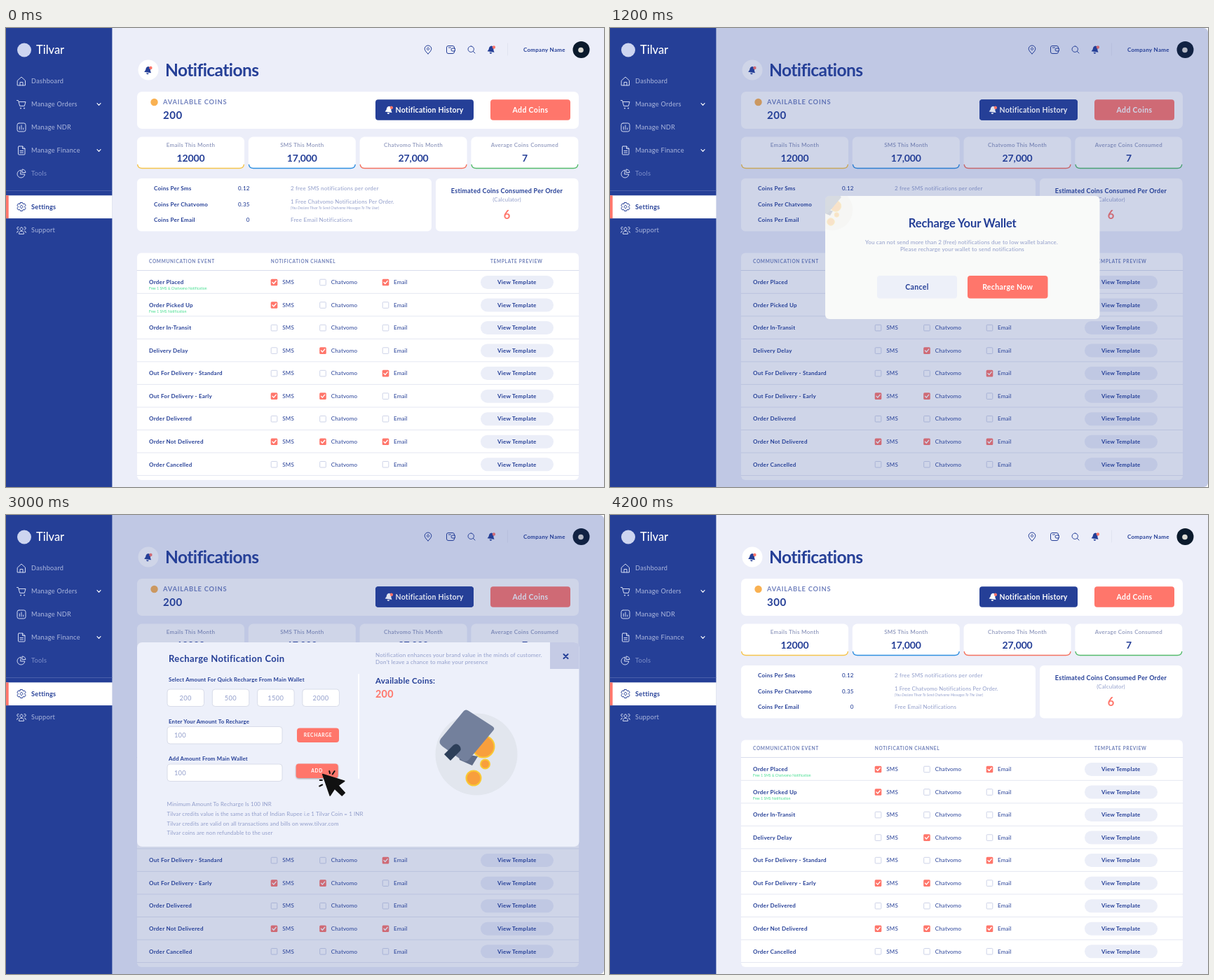
Recreate the animation shown at these times as an HTML page. Size 853 by 656 pixels, loop 5200 ms.

```html
<!DOCTYPE html>
<html lang="en">
<head>
<meta charset="utf-8">
<title>Notifications</title>
<style>
html, body { margin: 0; width: 100%; height: 100%; overflow: hidden; background: #eceef9; }
svg { display: block; width: 100%; height: 100%; }
text { font-family: Lato, "Open Sans", sans-serif; white-space: pre; }
.line { fill: none; stroke-linecap: round; stroke-linejoin: round; }
.lift { filter: drop-shadow(0 1.5px 1.2px #0005); }
</style>
</head>
<body>
<svg id="stage" viewBox="0 0 853 656"></svg>
<script>
const BLUE = '#253f97', CORAL = '#ff766b', SOFT = '#929ecb', WHITE = '#fff';
const BRAND = 'Tilvar', CHAT = 'Chatvomo';
const STEP = 600, LOOP = 5200;

const rect = (x, y, w, h, fill, r = 0, more = '') =>
  `<rect x="${x}" y="${y}" width="${w}" height="${h}" rx="${r}" fill="${fill}" ${more}/>`;
const disc = (x, y, r, fill, more = '') =>
  `<circle cx="${x}" cy="${y}" r="${r}" fill="${fill}" ${more}/>`;
const shape = (d, fill) => `<path d="${d}" fill="${fill}"/>`;
const line = (d, color, width = 1) =>
  `<path class="line" d="${d}" stroke="${color}" stroke-width="${width}"/>`;
const at = (x, y, body, more = '') => `<g transform="translate(${x} ${y}) ${more}">${body}</g>`;

const text = (s, x, y, size, fill = BLUE, weight = 400, anchor = 'start', gap = .02) =>
  `<text x="${x}" y="${y}" font-size="${size}" fill="${fill}" font-weight="${weight}" ` +
  `text-anchor="${anchor}" letter-spacing="${gap}em">${s.replace(/&/g, '&amp;')}</text>`;
const bold = (s, x, y, size = 8, fill = BLUE, gap = .033) => text(s, x, y, size, fill, 700, 'start', gap);
const mid = (s, x, y, size, fill = BLUE, gap = .033, weight = 700) =>
  text(s, x, y, size, fill, weight, 'middle', gap);

const button = (s, x, y, w, h, fill, color, size, lifted, gap) =>
  `<g ${lifted ? 'class="lift"' : ''}>${rect(x, y, w, h, fill, 4)}</g>` +
  mid(s, x + w / 2, y + h / 2 + size * .36, size, color, gap);

const ICONS = {
  home: 'M-5.5-1L0-6L5.5-1V6H-5.5ZM-2 6V1.5H2V6',
  cart: 'M-6.5-5.5h2l2.2 8h6.6l1.7-6h-9.5M-1 5.2a.6.6 0 1 0 .1 0M4 5.2a.6.6 0 1 0 .1 0',
  chart: 'M-3.5-6h7q2.5 0 2.5 2.5v7q0 2.5-2.5 2.5h-7q-2.5 0-2.5-2.5v-7q0-2.5 2.5-2.5M-2.7 3V-1M0 3V-3M2.7 3V1',
  doc: 'M-3.5-6H1.5L5-2.5V5q0 1-1 1h-7.5q-1 0-1-1V-5q0-1 1-1M1.5-6v3.5H5M-2 .5H2.5M-2 3H2.5',
  pie: 'M-1-4.8A5.4 5.4 0 1 0 4.8 1H-1ZM1.5-6A5 5 0 0 1 6-1.5H1.5Z',
  gear: 'M-1.5-6h3l.8 2 2.2-.5 1.5 2.6-1.5 1.9 1.5 1.9-1.5 2.6-2.2-.5-.8 2h-3l-.8-2-2.2.5-1.5-2.6 1.5-1.9-1.5-1.9 1.5-2.6 2.2.5ZM0-2a2 2 0 1 0 .1 0',
  people: 'M0-4a2.2 2.2 0 1 0 .1 0M-3.5 5q0-3.7 3.5-3.7T3.5 5ZM-4-4.5a1.7 1.7 0 1 0-.5 3.3M4-4.5a1.7 1.7 0 1 1 .5 3.3M-6.3 3.5q0-2.7 2-2.7M6.3 3.5q0-2.7-2-2.7',
  pin: 'M0 6Q-4.8 1.5-4.8-1.2a4.8 4.8 0 0 1 9.6 0Q4.8 1.5 0 6M0-2.8a1.6 1.6 0 1 0 .1 0',
  wallet: 'M5.5-2V-3q0-2.5-2.5-2.5H-3q-2.5 0-2.5 2.5v6q0 2.5 2.5 2.5h6q2.5 0 2.5-2.5V2M6-2H3a2 2 0 0 0 0 4h3ZM-2.5-3h3',
  search: 'M-.8-5a4.2 4.2 0 1 0 .1 0M2.4 2.4L5 5',
  down: 'M-2.5-1.3L0 1.3L2.5-1.3',
  cross: 'M-3-3L3 3M3-3L-3 3'
};
const icon = (name, x, y, color = BLUE, width = 1) => at(x, y, line(ICONS[name], color, width));

const bell = (x, y, color) => at(x, y,
  shape('M0-5.5C-2.8-5-3.4-3-3.4 0L-5 3H5L3.4 0C3.4-3 2.8-5 0-5.5ZM-1.8 4h3.6q-.4 1.8-1.8 1.8t-1.8-1.8', color) +
  disc(3.4, -4, 2.2, CORAL), 'rotate(8)');

const ARROW = 'M1 1L32 10.8L23 17L32.5 27.5L28.5 31.5L18 21.5L11.5 31.5Z';
const CURSOR = shape(ARROW, '#111') + line(ARROW, '#111', 1.6) +
  line('M10.5-3.5l.8 3.2M18-3.5l-3 4.5M-3 9.5l3.2 0M-3.5 18l4-2', '#111', 2);

function sidebar() {
  const items = [['Dashboard', 'home', 76], ['Manage Orders', 'cart', 109], ['Manage NDR', 'chart', 142],
    ['Manage Finance', 'doc', 175], ['Tools', 'pie', 208], ['Settings', 'gear', 255.5], ['Support', 'people', 289]];
  return rect(0, 0, 151.4, 656, BLUE) + disc(26, 31.5, 10, '#cdd5f0') +
    text(BRAND, 43, 37, 16.4, WHITE, 500, 'start', 0) +
    line('M0 232.5H151', '#5368b0', .8) + rect(0, 239.3, 151.7, 32.8, WHITE) + rect(0, 239.3, 3.7, 32.8, CORAL) +
    items.map(([name, pic, y]) => {
      const on = name === 'Settings';
      return icon(pic, 22, y, on ? BLUE : '#d5dcf2') +
        text(name, 36, y + 3.2, 9.2, on ? BLUE : name === 'Tools' ? '#7f90cb' : '#adb8de', on ? 700 : 400, 'start', .03) +
        (/Orders|Finance/.test(name) ? icon('down', 132.5, y, WHITE, 1.2) : '');
    }).join('');
}

function header() {
  return icon('pin', 602, 31) + icon('wallet', 634, 31) + icon('search', 664, 31) + bell(692, 31, BLUE) +
    line('M715.5 22V39', '#dde1ef', .8) + bold('Company Name', 738, 34, 8) +
    disc(820.5, 31, 12, '#0b1a2c') + disc(820, 31.5, 3.8, '#dcdad2') +
    disc(203, 60, 14.5, WHITE) + bell(202.5, 60.5, BLUE) +
    bold('Notifications', 227, 69.3, 24.5, BLUE, -.023);
}

const historyButton = color => button('', 527, 102.3, 140, 29.5, BLUE, WHITE, 10) + bell(546, 117.3, color) +
  bold('Notification History', 555.5, 121, 10.5, color, .02);

function cards(coins, pressed) {
  const stats = [['Emails This Month', '12000', '#f5c44c'], ['SMS This Month', '17,000', '#2f8fe0'],
    [CHAT + ' This Month', '27,000', '#f4725f'], ['Average Coins Consumed', '7', '#55bb6c']];
  const rates = [['Sms', '0.12'], [CHAT, '0.35'], ['Email', '0']];
  return rect(187, 91, 630, 53, WHITE, 7) + disc(211.5, 106, 5.2, '#f9b152') +
    bold('AVAILABLE COINS', 224, 109.3, 9.3, '#7080bd', .085) + bold(coins, 224, 129.8, 15) +
    historyButton(WHITE) +
    button('Add Coins', 691, 102.3, 114, 29.5, CORAL, WHITE, 10.5, pressed) +
    stats.map(([name, n, color], i) => {
      const x = 187 + i * 158.8;
      return rect(x, 155.5, 153, 45.5, WHITE, 7) +
        line(`M${x + .7} 195.5Q${x + 1.5} 200.5 ${x + 7} 200.5h139q5.5 0 6.3-5`, color, 1.5) +
        mid(name, x + 76.5, 169.6, 8, '#8f98bd', .035, 600) + mid(n, x + 76.5, 191, 14, BLUE, -.01);
    }).join('') +
    rect(187, 215, 420, 75.5, WHITE, 6) + rect(613, 215, 203.5, 75.5, WHITE, 6) +
    rates.map(([name, n], i) => {
      const y = 232.3 + i * 22.5;
      return bold('Coins Per ' + name, 211, y) + text(n, 347.5, y, 8, BLUE, 500, 'end');
    }).join('') +
    text('2 free SMS notifications per order', 406, 232.3, 8, SOFT, 400, 'start', .025) +
    text(`1 Free ${CHAT} Notifications Per Order.`, 406, 251.2, 7.8, SOFT) +
    `<g font-style="italic">${text(`(You Declare ${BRAND} To Send ${CHAT} Messages To The User)`, 406, 258.8, 4.8, SOFT)}</g>` +
    text('Free Email Notifications', 406, 277.3, 8, SOFT, 400, 'start', .025) +
    mid('Estimated Coins Consumed Per Order', 714.5, 235.6, 9, BLUE, .028) +
    mid('(Calculator)', 714.5, 247.5, 7.8, SOFT, .02, 400) + mid('6', 714.5, 273, 16.5, CORAL, 0);
}

function table(hints) {
  const rows = [['Order Placed', '101'], ['Order Picked Up', '100'], ['Order In-Transit', '000'],
    ['Delivery Delay', '010'], ['Out For Delivery - Standard', '001'], ['Out For Delivery - Early', '110'],
    ['Order Delivered', '000'], ['Order Not Delivered', '111'], ['Order Cancelled', '000']];
  const channels = [['SMS', 382.5, 394.3], [CHAT, 452, 463.7], ['Email', 541.5, 553]];
  const head = (s, x) => bold(s, x, 336.3, 6.5, '#7080b9', .108);
  const check = (x, y, on) => on
    ? rect(x - 4.8, y - 4.8, 9.6, 9.6, CORAL, 1.5) + at(x, y, line('M-2.5 0L-.7 2L2.7-2', WHITE, 1.4))
    : rect(x - 4.3, y - 4.3, 8.6, 8.6, 'none', 1, 'stroke="#cdd3e8"');
  return rect(187, 321.5, 630, 324.5, WHITE, 6) + line('M187 346.5H817', '#d8ddec') +
    head('COMMUNICATION EVENT', 204) + head('NOTIFICATION CHANNEL', 377.7) + head('TEMPLATE PREVIEW', 691) +
    rows.map(([name, on], i) => {
      const y = 363.5 + i * 32.53;
      return bold(name, 204, y + 2.8) + line(`M187 ${y + 15.8}H817`, '#e1e5f1', .9) +
        channels.map(([label, x, tx], k) => check(x, y, on[k] === '1') + text(label, tx, y + 2.8, 8)).join('') +
        rect(677, y - 9.5, 104, 19, '#ebeef8', 9.5) + mid('View Template', 728.8, y + 2.8, 8);
    }).join('') +
    (hints ? text(`Free 1 SMS & ${CHAT} Notification`, 204, 374.3, 4.9, '#3fdc8c') +
      text('Free 1 SMS Notification', 204, 406.8, 4.9, '#3fdc8c') : '');
}

function wallet(back) {
  const coin = (x, y, r) => disc(x, y, r, '#f89f3c', 'stroke="#f9c935" stroke-width="2"');
  return disc(671, 342, 58.5, back) + coin(681, 331, 15.5) + coin(683.5, 356, 6.5) + coin(667, 376, 10.5) +
    shape('M645 340L673 345L665 358L647 350Z', '#5f6c88') +
    shape('M653 280Q656 277 660 280L694 302Q698 305 695 308L660 350Q656 354 651 351L623 331Q616 326 620 320Z', '#73809c') +
    shape('M625 342L638 329Q643 325 647 330T646 339L634 351Z', '#2d3f59');
}

function rechargePrompt(pressed) {
  return rect(307, 240, 391.5, 176, '#f9faf9', 6) +
    `<clipPath id="box">${rect(307, 240, 391.5, 176, WHITE, 6)}</clipPath>` +
    `<g clip-path="url(#box)" opacity=".25">${at(-18.5, 89, wallet('#eeece8'), 'scale(.5)')}</g>` +
    mid('Recharge Your Wallet', 502.7, 285.2, 16.5, BLUE, -.008) +
    mid('You can not send more than 2 (free) notifications due to low wallet balance.', 501.5, 309.2, 8, SOFT, .02, 400) +
    mid('Please recharge your wallet to send notifications', 502.5, 319.2, 8, SOFT, .02, 400) +
    button('Cancel', 381, 354, 114, 32.5, '#edf0f9', BLUE, 10.5) +
    button('Recharge Now', 510, 354, 114.5, 32.5, CORAL, WHITE, 10.5, pressed);
}

function rechargeForm(pressed) {
  const field = (x, y, w) => rect(x, y, w, 24.5, WHITE, 4, 'stroke="#d8dce9"');
  const notes = ['Minimum Amount To Recharge Is 100 INR',
    `${BRAND} credits value is the same as that of Indian Rupee i.e 1 ${BRAND} Coin = 1 INR`,
    `${BRAND} credits are valid on all transactions and bills on www.${BRAND.toLowerCase()}.com`,
    `${BRAND} coins are non refundable to the user`];
  return rect(187, 182, 630.5, 292, '#edf0fa', 7) +
    shape('M776 182H810.5Q817.5 182 817.5 189V220H776Z', '#c5cbe5') + icon('cross', 798.5, 202, BLUE, 2) +
    bold('Recharge Notification Coin', 232, 209.6, 13, BLUE, .03) +
    text('Notification enhances your brand value in the minds of customer.', 527, 202.6, 8, SOFT) +
    text('Don’t leave a chance to make your presence', 527, 213, 8, SOFT) +
    line('M503 228V376', WHITE, 2) +
    bold('Select Amount For Quick Recharge From Main Wallet', 232, 238.3, 7.8, BLUE, .025) +
    [200, 500, 1500, 2000].map((n, i) =>
      field(230 + i * 64.3, 249, 52.5) + mid('' + n, 256.2 + i * 64.3, 264.8, 9.3, SOFT, .04, 400)).join('') +
    bold('Enter Your Amount To Recharge', 232, 297.6, 7.8, BLUE, .025) + field(230, 302.5, 164) +
    text('100', 240, 318.2, 9.3, SOFT) +
    bold('Add Amount From Main Wallet', 232, 350.8, 7.8, BLUE, .025) + field(230, 356, 164) +
    text('100', 240, 371.7, 9.3, SOFT) +
    button('RECHARGE', 415, 304.5, 60, 20.5, CORAL, WHITE, 6.7, false, .1) +
    button('ADD', 413.7, 355.5, 60, 20.5, CORAL, WHITE, 6.7, pressed, .1) +
    notes.map((s, i) => text(s, 229.5, 416.3 + i * 13.6, 7.9, SOFT, 400, 'start', .015)).join('') +
    bold('Available Coins:', 527, 240.8, 11.5, BLUE, .025) + bold('200', 527, 261, 14.3, CORAL, .02) +
    wallet('#e2e6ee');
}

function success() {
  const person =
    line('M474 263L482 265L479 283M473 264L473 281', '#2e2b50', 6) +
    line('M471 244L464 257L450 262', '#f0647c', 4) + line('M482 241L492 234', '#f0647c', 4) +
    shape('M469 243Q476 238 484 242L486 263H466Z', '#f2708a') +
    disc(476.5, 234, 5.5, '#f3a894') +
    shape('M469 239Q466 229 473 227Q481 225 482 232Q487 238 483 247Q480 243 480 237Q476 236 474 232Q472 239 469 239', '#2e2b50');
  return rect(187, 182, 630.5, 292, WHITE, 7) + icon('cross', 798.5, 202, BLUE, 2) +
    shape('M442 206Q456 198 474 202T510 210T563 206V245Q553 256 563 268V293Q548 301 530 297T490 297T442 297V268Q446 256 442 244Z', '#e1f4f0') +
    line('M443 319H562', '#e1f4f0', 1.5) +
    disc(502, 246, 29, '#4fb04f') + rect(483, 222, 42, 88, '#10b49b', 5, 'stroke="#292b58" stroke-width="3"') +
    rect(494, 222, 20, 5, '#292b58', 2.5) + rect(500, 224, 8, 1, WHITE, .5) +
    disc(504, 266.5, 11, '#38c46b') + line('M499 267L502.5 270.5L509 263.5', WHITE, 2.2) + person +
    shape('M530 230Q527 219 541 218Q540 228 530 230M522 215Q526 213 529 218Q523 220 522 215', '#22a997') +
    line('M454 308L458 312L463 307M454 315L458 312L463 315', '#55a996', 2) +
    shape('M542 320Q545 315 547 319Q549 313 551 319Q554 315 555 320Z', '#18a98c') +
    mid('Transaction Successfull', 502.5, 344.2, 18.5, BLUE, 0) +
    mid('Your transaction for buying 100 coins was successfull', 502.5, 361.8, 8, SOFT, .015, 400) +
    rect(458.5, 389.5, 88, 28, BLUE, 4, 'stroke="#1b2a78" stroke-width="1.4"') + mid('Done', 502.5, 407, 10.5, WHITE) +
    mid('Redirecting in 02 seconds', 502.5, 454.8, 9, '#8e8f99', .03, 400);
}

function scene(step) {
  const dim = step > 1 && step < 7;
  const veilX = step === 6 ? 152 : 140;
  const modal = step < 2 ? '' : step < 4 ? rechargePrompt(step === 3)
    : step < 6 ? rechargeForm(step === 5) : step === 6 ? success() : '';
  const cursor = { 1: [790, 126], 3: [608.7, 378], 5: [450.7, 369.5] }[step];
  return rect(0, 0, 853, 656, dim ? WHITE : '#eceef9') +
    rect(veilX, 0, 853 - veilX, 656, '#eceef9', dim ? 6 : 0) +
    header() + cards(step < 6 ? '200' : '300', step === 1) + table(!dim) +
    (dim ? rect(veilX, 0, 853 - veilX, 656, BLUE, 6, 'opacity=".22"') + historyButton('#dfe3f0') : '') +
    sidebar() + modal + (cursor ? at(...cursor, CURSOR) : '');
}

const stage = document.getElementById('stage');
const start = performance.now();
let shown = -1;
function tick(now) {
  const step = Math.min(7, Math.floor((Math.max(0, now - start) % LOOP) / STEP));
  if (step !== shown) stage.innerHTML = scene(shown = step);
  requestAnimationFrame(tick);
}
tick(start);
</script>
</body>
</html>
```
